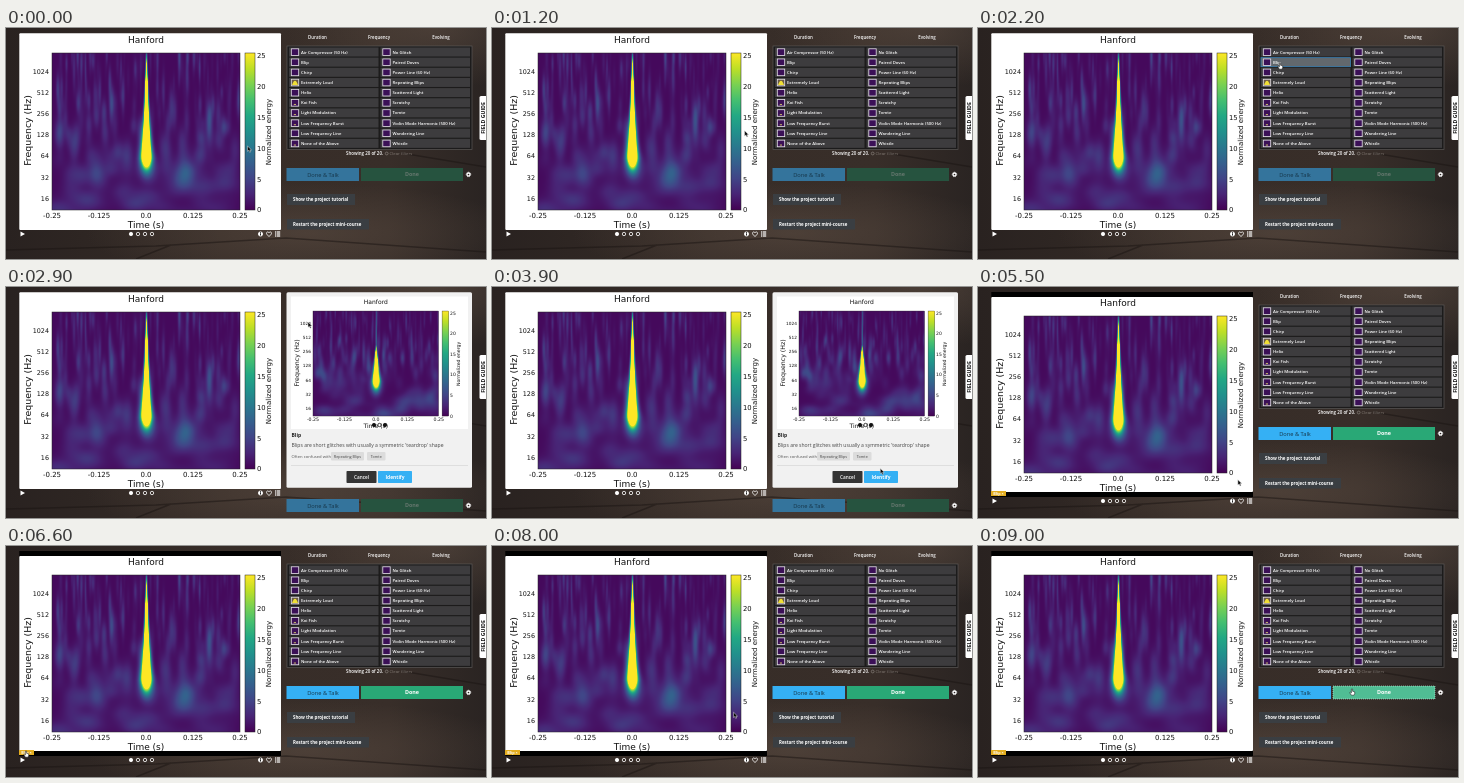
Animation of 480 by 231 pixels, one loop 9100 ms. Source, as an HTML page with a canvas:

```html
<!DOCTYPE html>
<html lang="en">
<head>
<meta charset="utf-8">
<title>Glitch classification</title>
<style>
html, body { margin: 0; width: 100%; height: 100%; overflow: hidden; background: #2a2320; }
svg { display: block; width: 480px; height: 231px; }
canvas { display: block; width: 188px; height: 157px; }
text { font-family: "Open Sans", sans-serif; }
.plot text { font-family: "DejaVu Sans", sans-serif; }
</style>
</head>
<body>
<svg id="stage" viewBox="0 0 480 231" xmlns="http://www.w3.org/2000/svg"></svg>
<script>
const LOOP = 9100;
const OPEN = 2500, IDENTIFY = 4200;
const VIRIDIS = ["440154", "482475", "414487", "355f8d", "2a788e", "21918c", "22a884", "44bf70", "7ad151", "bddf26", "fde725"];
const RGB = VIRIDIS.map(h => [0, 2, 4].map(i => parseInt(h.slice(i, i + 2), 16)));
const LABELS = ["Air Compressor (50 Hz)", "Blip", "Chirp", "Extremely Loud", "Helix", "Koi Fish", "Light Modulation",
  "Low Frequency Burst", "Low Frequency Line", "None of the Above", "No Glitch", "Paired Doves", "Power Line (60 Hz)",
  "Repeating Blips", "Scattered Light", "Scratchy", "Tomte", "Violin Mode Harmonic (500 Hz)", "Wandering Line", "Whistle"];

const rect = (x, y, w, h, fill, more = "") => `<rect x="${x}" y="${y}" width="${w}" height="${h}" fill="${fill}" ${more}/>`;
const text = (x, y, s, size, fill, more = "") =>
  `<text x="${x}" y="${y}" dy=".36em" font-size="${size}" fill="${fill}" ${more}>${s}</text>`;
const mid = 'text-anchor="middle"', end = 'text-anchor="end"', bold = 'font-weight="700"', semi = 'font-weight="600"';
const upright = (x, y, s, size, more = "") => text(0, 0, s, size, "#111", `${mid} transform="translate(${x} ${y}) rotate(-90)" ${more}`);

function plot(id) {
  let s = text(140, 11.5, "Hanford", 9, "#111", mid) + text(140, 196.6, "Time (s)", 9, "#111", mid);
  s += upright(22, 102.5, "Frequency (Hz)", 9.4) + upright(262.6, 104, "Normalized energy", 7);
  s += `<foreignObject x="46" y="25" width="188" height="157"><canvas id="${id}" width="188" height="157"></canvas></foreignObject>`;
  s += rect(46, 25, 188, 157, "none", 'stroke="#222" stroke-width=".5"');
  s += rect(239, 25, 10, 157, "url(#viridis)", 'stroke="#222" stroke-width=".5"');
  for (let i = 0; i < 7; i++) s += text(43, 43.3 + 21.2 * i, 1024 >> i, 6.4, "#111", end);
  for (let i = 0; i < 6; i++) s += text(251, 182 - 30.8 * i, 5 * i, 6.8, "#111");
  ["-0.25", "-0.125", "0.0", "0.125", "0.25"].forEach((n, i) => s += text(46 + 47 * i, 187, n, 7, "#111", mid));
  return `<g class="plot">${s}</g>`;
}

function listRow(label, i) {
  const x = i < 10 ? 283 : 374.5, y = 24 + 10.15 * (i % 10), loud = i === 3;
  let s = rect(x, y - 4.5, 89.5, 9, "#3d3c3e", i === 1 ? 'id="blip"' : "");
  s += rect(x + 2.3, y - 3.2, 7.4, 6.6, loud ? "#6b5a45" : "#3b1057", 'stroke="#e6e2ea" stroke-width=".8"');
  if (loud) s += `<path d="M${x + 3} ${y + 2.6}Q${x + 6} ${y - 6} ${x + 9} ${y + 2.6}z" fill="#f0df35"/>`;
  else if (i > 4 && i < 10 && i !== 8) s += rect(x + 4.8, y + 1.2, 2.2, 1, "#c9b96a");
  return s + text(x + 12, y, label, 4.25, "#fff", semi);
}

const ring = (x, y, r, fill, stroke) => `<circle cx="${x}" cy="${y}" r="${r}" fill="${fill}" stroke="${stroke}" stroke-width=".8"/>`;

const stops = VIRIDIS.map((c, i) => `<stop offset="${i / 10}" stop-color="#${c}"/>`).join("");
const defs = `<defs>
  <linearGradient id="viridis" x1="0" y1="1" x2="0" y2="0">${stops}</linearGradient>
  <linearGradient id="wall"><stop offset="0" stop-color="#292220"/><stop offset=".45" stop-color="#372d28"/>
    <stop offset=".8" stop-color="#382e29"/><stop offset="1" stop-color="#2a2422"/></linearGradient>
  <radialGradient id="glow"><stop offset="0" stop-color="#5a4b41" stop-opacity=".6"/><stop offset="1" stop-color="#5a4b41" stop-opacity="0"/></radialGradient>
</defs>`;

const backdrop = rect(0, 0, 480, 231, "url(#wall)") +
  '<ellipse cx="430" cy="0" rx="150" ry="60" fill="url(#glow)"/><ellipse cx="300" cy="205" rx="220" ry="50" fill="url(#glow)"/>' +
  '<path d="M0 222L150 218 280 210 480 224M130 231L165 217M395 125L480 139" fill="none" stroke="#1b1513" stroke-width="1.5" opacity=".5"/>';

const controls = '<path d="M14.5 203.5l4.5 2.5-4.5 2.5z" fill="#fff"/>' +
  [125, 132, 139, 146].map((x, i) => ring(x, 206, 1.7, i ? "none" : "#fff", "#fff")).join("") +
  ring(254.5, 206, 2.1, "#fff", "#fff") + rect(254, 205.3, 1, 2.2, "#222") + rect(254, 204, 1, .8, "#222") +
  '<path d="M263 208.6l-2.3-2.5c-1-2 1.5-3 2.3-1.2c.8-1.8 3.3-.8 2.3 1.2z" fill="none" stroke="#fff" stroke-width=".8"/>' +
  [204, 206, 208].map(y => rect(269, y - .6, 1, 1.2, "#fff") + rect(270.6, y - .6, 3.6, 1.2, "#fff")).join("");

const list = text(311.5, 9.5, "Duration", 4.4, "#fff", `${mid} ${semi}`) + text(373, 9.5, "Frequency", 4.4, "#fff", `${mid} ${semi}`) +
  text(435, 9.5, "Evolving", 4.4, "#fff", `${mid} ${semi}`) +
  rect(281, 18, 185, 103.5, "#1c1b1b", 'stroke="#5b5856" stroke-width=".7"') + LABELS.map(listRow).join("") +
  text(340, 125.5, "Showing 20 of 20.", 4.45, "#fff", semi) +
  ring(380.7, 125.5, 1.4, "none", "#827a74") + text(383.5, 125.5, "Clear filters", 4.3, "#827a74");

const actions = rect(280.5, 140, 72.5, 13, "#35b0f4", 'id="talk"') +
  text(317, 146.5, "Done &amp; Talk", 5.7, "#16364a", mid) +
  rect(355, 140, 102, 13, "#29a876", 'id="done"') + text(406, 146.5, "Done", 5.4, "#fff", `id="doneText" ${mid} ${bold}`) +
  '<circle cx="462.5" cy="146.5" r="1.5" fill="none" stroke="#fff" stroke-width="1.3"/>' +
  '<circle cx="462.5" cy="146.5" r="2.3" fill="none" stroke="#fff" stroke-width=".8" stroke-dasharray=".95"/>' +
  rect(281, 166, 68, 11, "#3a3e42") + text(287, 171.5, "Show the project tutorial", 4.45, "#fff", bold) +
  rect(281, 191, 82, 10.5, "#3a3e42") + text(287, 196.3, "Restart the project mini-course", 4.4, "#fff", bold);

const popup = rect(280.5, 5.3, 185.5, 195.5, "#f1f1f1", 'rx="1.5"') + rect(285, 9.5, 177, 132.5, "#fff") +
  `<g transform="translate(276.2 7.3) scale(.669)">${plot("small")}</g>` +
  [368, 373.5, 379].map((x, i) => ring(x, 138, 1.7, i === 1 ? "#fff" : "#111", "#111")).join("") +
  text(285.5, 148.5, "Blip", 5, "#222", bold) +
  text(285.5, 158, "Blips are short glitches with usually a symmetric 'teardrop' shape", 5.05, "#444") +
  text(285.5, 169, "Often confused with", 4.2, "#555") +
  rect(325, 165, 33, 8.5, "#dcdcdc", 'rx="1"') + text(341.5, 169.2, "Repeating Blips", 3.8, "#444", mid) +
  rect(361, 165, 18.5, 8.5, "#dcdcdc", 'rx="1"') + text(370.2, 169.2, "Tomte", 3.8, "#444", mid) +
  rect(285, 178, 177, .6, "#d2d2d2") +
  rect(340.5, 184, 30, 12, "#343434", 'rx=".8"') + text(355.5, 190, "Cancel", 4.7, "#fff", `${mid} ${semi}`) +
  rect(372, 184, 34, 12, "#35b0f4", 'rx=".8"') + text(389, 190, "Identify", 4.9, "#fff", `${mid} ${bold}`);

const $ = id => document.getElementById(id);
$("stage").innerHTML = defs + backdrop +
  rect(13.3, 5, 261.7, 205, "#000", 'id="frame"') + rect(13.3, 5, 261.7, 197, "#fff", 'id="card" rx="1"') +
  `<g id="main">${plot("big")}</g><g id="controls">${controls}</g>` +
  `<g id="tag">${rect(13, 204, 15, 5, "#e3ad20")}${text(20.5, 206.4, "Blip ×", 3.8, "#fff", `${mid} ${bold}`)}</g>` +
  `<g id="list">${list}</g><g id="actions">${actions}</g><g id="popup">${popup}</g>` +
  rect(473.5, 68, 8, 44, "#fff", 'rx="1.5"') + upright(477.3, 90, "FIELD GUIDE", 5.2, bold) +
  `<g id="cursor" stroke-width=".5">
    <path id="arrow" fill="#080808" stroke="#ddd" d="M0 0v5.300l1.300-1 .9 2 1-.5-.9-1.900h1.700z"/>
    <path id="hand" fill="#fff" stroke="#080808" d="M-.6 0h1.200v2.300l2.100.5v2l-.7 1.400h-2.600l-1.700-2.600 .7-.4 1 .7z"/></g>`;

// Spectrogram: seeded vertical wisps, fine at the top and broad below, behind a saturated teardrop.
function spectrogram(id, tip, seed) {
  const rnd = () => (seed = seed * 16807 % 2147483647) / 2147483647;
  const wisps = Array.from({ length: 260 }, () => {
    const y = 160 * rnd() ** 1.3, low = (y / 157) ** 2.5;
    return {
      x: 188 * rnd(), y, sx: .9 + .7 * rnd() + 13 * low,
      sy: 7 + 14 * rnd() * (1 - low), a: .4 + 2.5 * rnd() ** 2 * (1 - .6 * low)
    };
  });
  wisps.push({ x: 94, y: 113, sx: 8, sy: 12, a: 6 }, { x: 148, y: 133, sx: 24, sy: 9, a: 2.5 });
  const ctx = $(id).getContext("2d"), img = ctx.createImageData(188, 157);
  for (let y = 0; y < 157; y++) for (let x = 0; x < 188; x++) {
    let v = .6;
    for (const w of wisps) v += w.a * Math.exp(-(((x - w.x) / w.sx) ** 2) - ((y - w.y) / w.sy) ** 2);
    const k = Math.max(0, (y - tip) / (105 - tip));
    const half = .8 + 4.2 * Math.min(k, 1) ** (tip ? 1.3 : 2);
    const amp = (7 + 53 * Math.min(1, k * 3.5)) * Math.exp(-((Math.max(0, y - 99) / 13) ** 2));
    v += amp * Math.exp(-(((x - 94) / half) ** 2));
    const p = Math.min(9.999, v / 2.55), i = p | 0, o = 4 * (y * 188 + x);
    for (let c = 0; c < 3; c++) img.data[o + c] = RGB[i][c] + (RGB[i + 1][c] - RGB[i][c]) * (p - i);
    img.data[o + 3] = 255;
  }
  ctx.putImageData(img, 0, 0);
}
spectrogram("big", 0, 4711);
spectrogram("small", 50, 977);

// Pointer legs: start, stop, destination.
const LEGS = [[900, 2000, 302, 35], [3050, 4000, 391, 186], [5100, 6100, 20, 205], [7200, 8570, 374, 143]];
function pointer(t) {
  let x = 241.5, y = 118;
  for (const [a, b, tx, ty] of LEGS) {
    const p = Math.min(1, Math.max(0, (t - a) / (b - a))), e = p * p * (3 - 2 * p);
    x += (tx - x) * e;
    y += (ty - y) * e;
  }
  return [x, y];
}

const set = (id, values) => { for (const k in values) $(id).setAttribute(k, values[k]); };
const show = (id, on) => $(id).style.display = on ? "" : "none";

function draw(t) {
  const [x, y] = pointer(t);
  const over = (l, top, w, h) => x >= l && x < l + w && y >= top && y < top + h;
  const open = t >= OPEN && t < IDENTIFY, ready = t >= IDENTIFY;
  const onBlip = !open && over(283, 29.6, 89.5, 9), onDone = ready && over(355, 140, 102, 13);
  const onTalk = ready && over(280.5, 140, 72.5, 13), onTag = ready && over(13, 203, 15, 6);

  show("popup", open);
  show("list", !open);
  show("frame", ready);
  show("tag", ready);
  set("card", { y: ready ? 10 : 5.3, height: ready ? 195 : 196.7 });
  set("main", { transform: `translate(0 ${ready ? 4 : 0})` });
  set("controls", { transform: `translate(0 ${ready ? 8 : 0})` });
  set("actions", { transform: `translate(0 ${open ? 72 : 0})` });
  set("talk", { fill: onTalk ? "#5fc1f7" : ready ? "#35b0f4" : "#34749c" });
  set("done", { fill: onDone ? "#50bd94" : ready ? "#29a876" : "#26533f",
    stroke: onDone ? "#c9e9dc" : "none", "stroke-width": .6, "stroke-dasharray": "1 1" });
  set("doneText", { fill: ready ? "#fff" : "#66776e" });
  set("blip", { fill: onBlip ? "#62686d" : "#3d3c3e", stroke: onBlip ? "#3a80b4" : "none", "stroke-width": .8 });

  const hand = onBlip || onDone || onTalk || onTag || open && over(340.5, 184, 65.5, 12);
  show("hand", hand);
  show("arrow", !hand);
  set("cursor", { transform: `translate(${x} ${y})` });
}

function tick() {
  draw(performance.now() % LOOP);
  requestAnimationFrame(tick);
}
tick();
</script>
</body>
</html>
```
